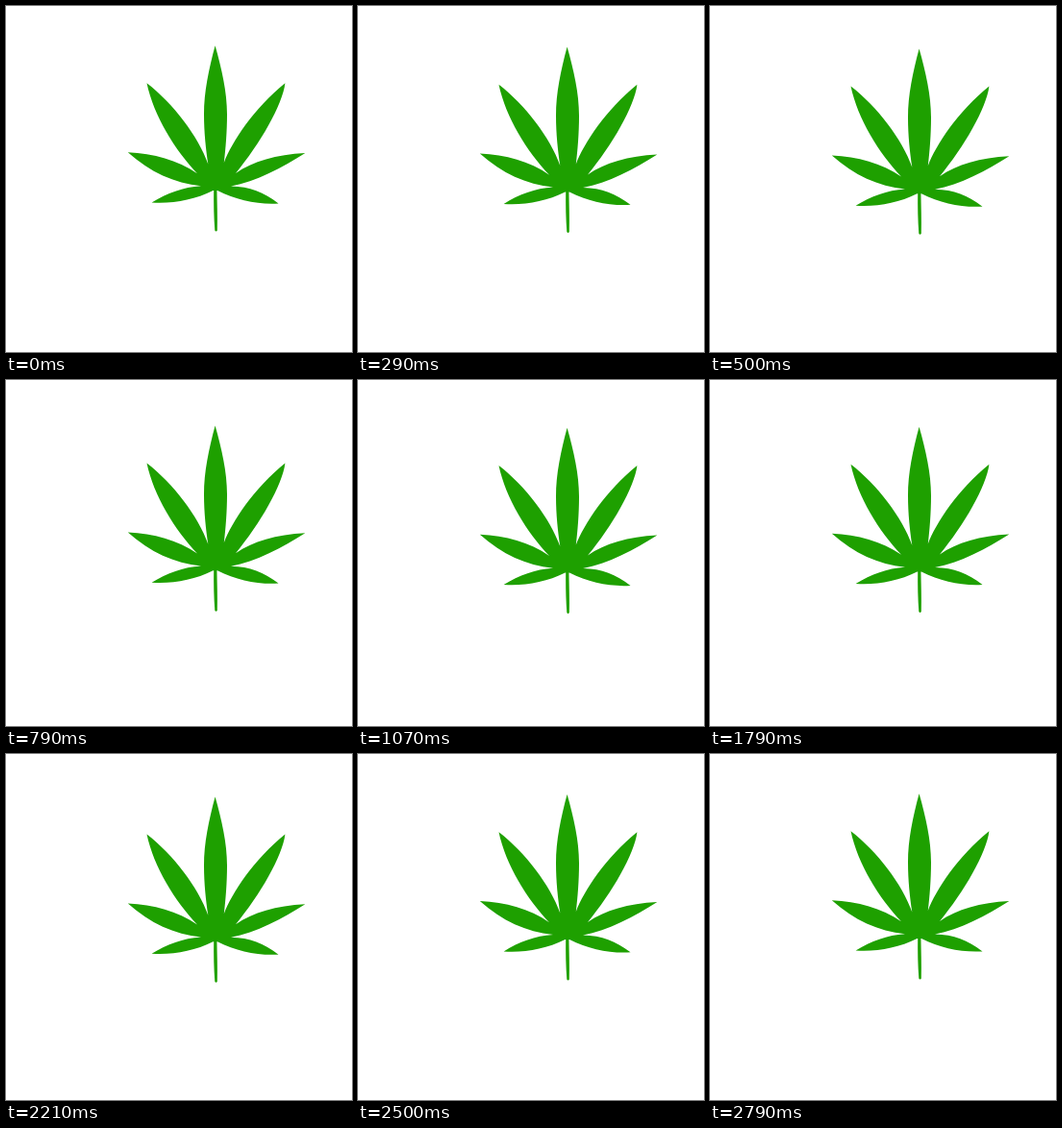
Animation, 360 px wide and 360 px high, one loop 2.87 s. Source, as an HTML page:

```html
<!DOCTYPE html>
<html lang="en">
<head>
<meta charset="utf-8">
<title>Bobbing leaf</title>
<style>
  html, body { margin: 0; width: 100%; height: 100%; overflow: hidden; background: #fff; }
  svg { display: block; width: 100vw; height: 100vh; }
</style>
</head>
<body>
<svg viewBox="0 0 360 360">
  <g id="leaf" fill="#1ea000">
    <!-- seven leaflets, clockwise from the top tip -->
    <path d="M217.6 41.2
      C224.5 65.5 230 89.5 230 112.5 C230 131.5 228.5 148.5 226.8 163
      C235 141.5 258 106.5 290.4 80.3
      C287.8 102.6 264.3 143.6 239 174
      C257 161.5 281 154.5 311.3 153
      C288 167.9 260 182.8 234 187.5
      C254 188 268 193.5 283.5 205.4
      C261.5 206.6 240.5 202.1 220 192
      L215.5 192
      C195.5 201.9 173.5 205.9 151.6 204.5
      C168 194.5 184 188.5 203 187.2
      C175 184.3 150 172.9 126.8 152.2
      C154 153.5 178 160 199 174.3
      C175.7 149.6 153.8 114.6 146.5 80.3
      C174 101.5 200 135.5 210.3 164.5
      C208 149.5 206 131.5 206 112.5
      C206 89.5 211 65.5 217.6 41.2Z"/>
    <path d="M216.2 190 C216 206 216.3 220 217.3 233.5 Q218.6 235.6 219.8 233.5 C220.2 220 219.6 205 219.4 190Z"/>
  </g>
</svg>
<script>
  const LOOP = 2870, FRAMES = 40, STEP = 71.6, RISE = 9.5;
  const leaf = document.getElementById("leaf");

  function draw(ms) {
    // steps begin on 10 ms ticks
    const step = Math.min(FRAMES - 1, Math.floor((ms % LOOP + 9.9) / STEP));
    const y = RISE / 2 * (1 - Math.cos(2 * Math.PI * (step + 1) / FRAMES));
    leaf.setAttribute("transform", `translate(0 ${y.toFixed(2)})`);
  }

  const start = performance.now();
  function tick() {
    draw(performance.now() - start);
    requestAnimationFrame(tick);
  }
  tick();
</script>
</body>
</html>
```
